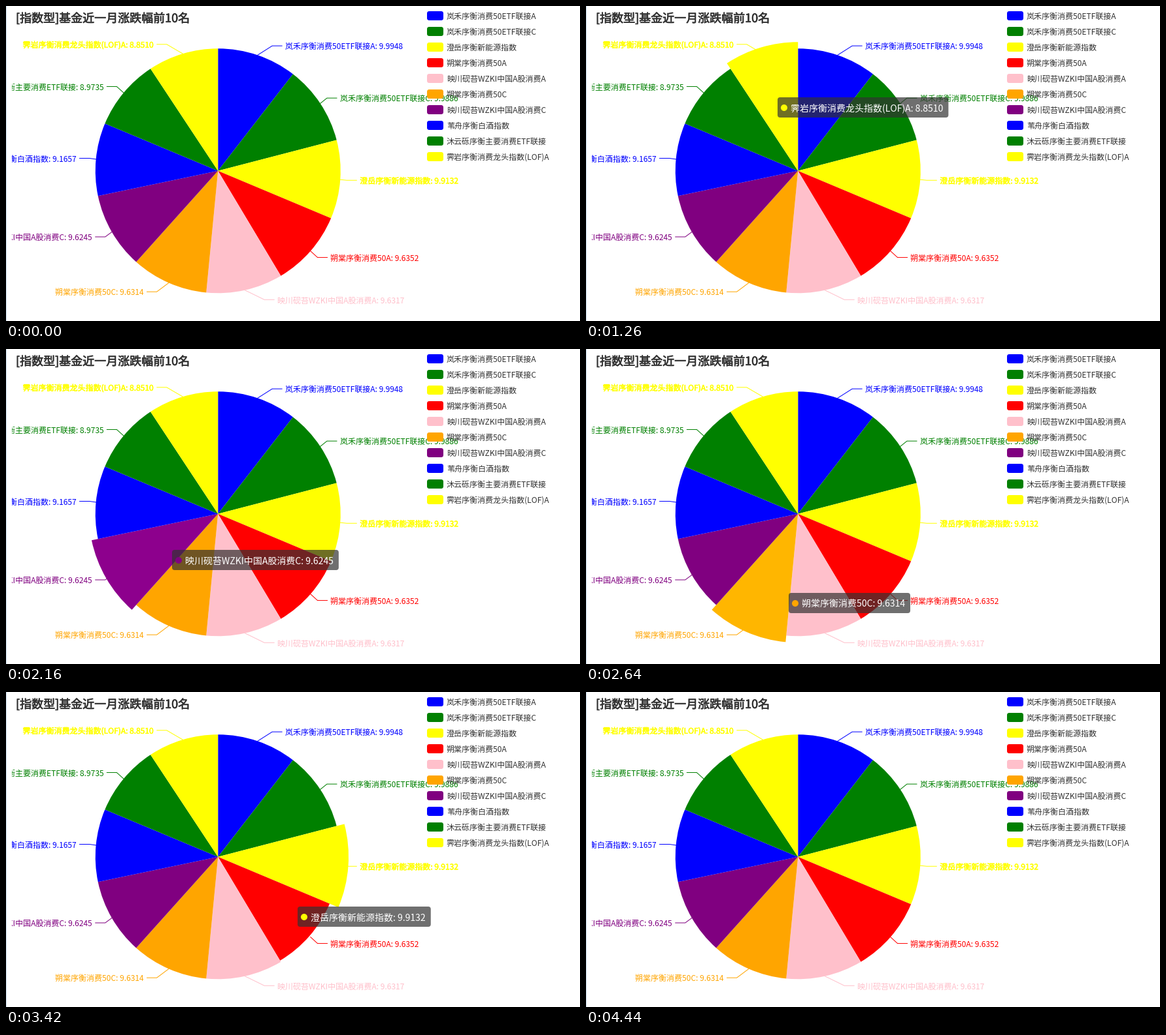
These frames come from a looping animation (878x483 px, 4.8 s). A matplotlib script:

```python
from itertools import cycle

import numpy as np
import matplotlib.pyplot as plt
from matplotlib import patheffects
from matplotlib.animation import FuncAnimation
from matplotlib.colors import to_rgb
from matplotlib.patches import Circle, FancyBboxPatch, Rectangle, Wedge

W, H, DPI = 878, 483, 64
STEP, LOOP = 60, 4800
PT = 72 / DPI  # points per pixel
CX, CY, RADIUS, GROW = 324.25, 252.75, 187.5, 10
LEADER = 15  # length of each leader segment

FUNDS = {
    "岚禾序衡消费50ETF联接A": 9.9948,
    "岚禾序衡消费50ETF联接C": 9.9886,
    "澄岳序衡新能源指数": 9.9132,
    "朔棠序衡消费50A": 9.6352,
    "映川砚苔WZKI中国A股消费A": 9.6317,
    "朔棠序衡消费50C": 9.6314,
    "映川砚苔WZKI中国A股消费C": 9.6245,
    "苇舟序衡白酒指数": 9.1657,
    "沐云砾序衡主要消费ETF联接": 8.9735,
    "霁岩序衡消费龙头指数(LOF)A": 8.8510,
}
PALETTE = cycle(["blue", "green", "yellow", "red", "pink", "orange", "purple"])
COLORS = [color for _, color in zip(FUNDS, PALETTE)]
CAPTIONS = [f"{name}: {value:.4f}" for name, value in FUNDS.items()]
VALUES = np.array(list(FUNDS.values()))
EDGES = np.concatenate([[0], np.cumsum(VALUES)]) / VALUES.sum() * 360

# The pointer circles the pie counterclockwise: ms, degrees from top, distance
SWEEP_MS, SWEEP_DEG, SWEEP_DIST = np.transpose([
    (120, 140, 140), (510, 72, 123), (780, 25, 178), (1680, -61.6, 111),
    (2160, -111.3, 97), (2640, -161.4, 107), (3420, -241.2, 116),
    (3840, -282.3, 127), (4200, -300, 167),
])
LAG = 125  # the tooltip trails the pointer
ENTER, LEAVE, HIDE = 105, 4185, 4300
FIRST, LAST = 3, -9  # slices passed, counted down through zero

plt.rcParams["font.family"] = "Noto Sans CJK JP"
fig = plt.figure(figsize=(W / DPI, H / DPI), dpi=DPI, facecolor="white")
ax = fig.add_axes([0, 0, 1, 1])
ax.set_xlim(0, W)
ax.set_ylim(H, 0)
ax.axis("off")


def write(x, y, text, size, color, align="left", z=3, bold=0):
    """Place text with its ideographs vertically centred on y."""
    item = ax.text(x, y + 0.38 * size, text, fontsize=size * PT, color=color,
                   ha=align, va="baseline", zorder=z)
    if bold:
        item.set_path_effects(
            [patheffects.withStroke(linewidth=bold * PT, foreground=color)])
    return item


def rounded(x, y, w, h, radius, **style):
    shape = f"round,pad=0,rounding_size={radius}"
    return ax.add_patch(FancyBboxPatch((x, y), w, h, boxstyle=shape,
                                       linewidth=0, **style))


def polar(degrees, distance):
    angle = np.radians(degrees)
    return CX + distance * np.sin(angle), CY - distance * np.cos(angle)


def lift(color):
    return tuple(min(1, c * 1.1) for c in to_rgb(color))


def elastic_out(k):
    if k <= 0:
        return 0
    if k >= 1:
        return 1
    return 2 ** (-10 * k) * np.sin((k - 0.1) * 5 * np.pi) + 1


def find_hovers():
    """List (slice, start, end) for every slice the pointer passes over."""
    passed = range(FIRST, LAST - 1, -1)
    starts = [ENTER]
    for k in passed[1:]:
        turn, index = divmod(k, len(VALUES))
        edge = EDGES[index + 1] + 360 * turn
        starts.append(np.interp(-edge, -SWEEP_DEG, SWEEP_MS) - LAG)
    return [(k % len(VALUES), start, end)
            for k, start, end in zip(passed, starts, starts[1:] + [LEAVE])]


HOVERS = find_hovers()


def slice_radius(index, t):
    grow = sum(elastic_out((t - start) / 300) - elastic_out((t - end) / 300)
               for hovered, start, end in HOVERS if hovered == index)
    return RADIUS + GROW * grow


def build_slice(index):
    start, end = EDGES[index:index + 2]
    color = COLORS[index]
    wedge = Wedge((CX, CY), RADIUS, start - 90, end - 90, facecolor=color,
                  linewidth=0, zorder=2)

    # Labels sit on a wider circle, beyond the two leader segments
    middle = (start + end) / 2
    side = 1 if middle < 180 else -1
    edge_x, edge_y = polar(middle, RADIUS)
    y = polar(middle, RADIUS + LEADER)[1]
    x = CX + side * np.sqrt((RADIUS + 2 * LEADER) ** 2 - (y - CY) ** 2)
    ax.plot([edge_x, x - 20 * side, x - 5 * side], [edge_y, y, y],
            color=color, lw=PT, zorder=1)
    write(x, y + 0.5, CAPTIONS[index], 12, color,
          "left" if side > 0 else "right",
          bold=0.5 if color == "yellow" else 0)
    return ax.add_patch(wedge)


def build_legend():
    for i, (name, color) in enumerate(zip(FUNDS, COLORS)):
        y = 15 + 24 * i
        rounded(644, y - 7, 25, 14, 3.5, facecolor=color, zorder=5)
        write(674, y + 0.5, name, 12, "#333333", z=5)


wedges = [build_slice(i) for i in range(len(VALUES))]
build_legend()
write(15, 18, "[指数型]基金近一月涨跌幅前10名", 18, "#333333", bold=0.7)

# Labels are cut off at the left margin of the chart
ax.add_patch(Rectangle((0, 0), 9, H, facecolor="white", linewidth=0, zorder=4))
ax.add_patch(Rectangle((0, 0), 1, H, facecolor="#c9dcec", linewidth=0, zorder=5))

tip_box = rounded(0, 0, 200, 31, 4, facecolor=(0.196, 0.196, 0.196, 0.7), zorder=8)
tip_dot = ax.add_patch(Circle((0, 0), 5, linewidth=0, zorder=9))
tip_text = write(0, 0, "", 14, "white", z=9)
tooltip = (tip_box, tip_dot, tip_text)


def place_tooltip(t, index):
    x, y = polar(np.interp(t, SWEEP_MS, SWEEP_DEG),
                 np.interp(t, SWEEP_MS, SWEEP_DIST))
    left, top = round(x + 20), round(y + 20)
    tip_dot.set_center((left + 10, top + 16))
    tip_dot.set_facecolor(COLORS[index])
    tip_text.set_position((left + 20, top + 16 + 0.38 * 14))
    tip_text.set_text(CAPTIONS[index])
    tip_box.set_bounds(left, top, tip_text.get_window_extent().width + 28, 31)


def update(frame):
    t = frame * STEP
    entered = [index for index, start, _ in HOVERS if start <= t]
    for i, wedge in enumerate(wedges):
        active = t < LEAVE and entered[-1:] == [i]
        wedge.set_radius(slice_radius(i, t))
        wedge.set_facecolor(lift(COLORS[i]) if active else COLORS[i])
    shown = bool(entered) and t < HIDE
    for part in tooltip:
        part.set_visible(shown)
    if shown:
        place_tooltip(t, entered[-1])
    return [*wedges, *tooltip]


animation = FuncAnimation(fig, update, frames=LOOP // STEP, interval=STEP,
                          repeat=True, repeat_delay=0, blit=False)
plt.show()
```
